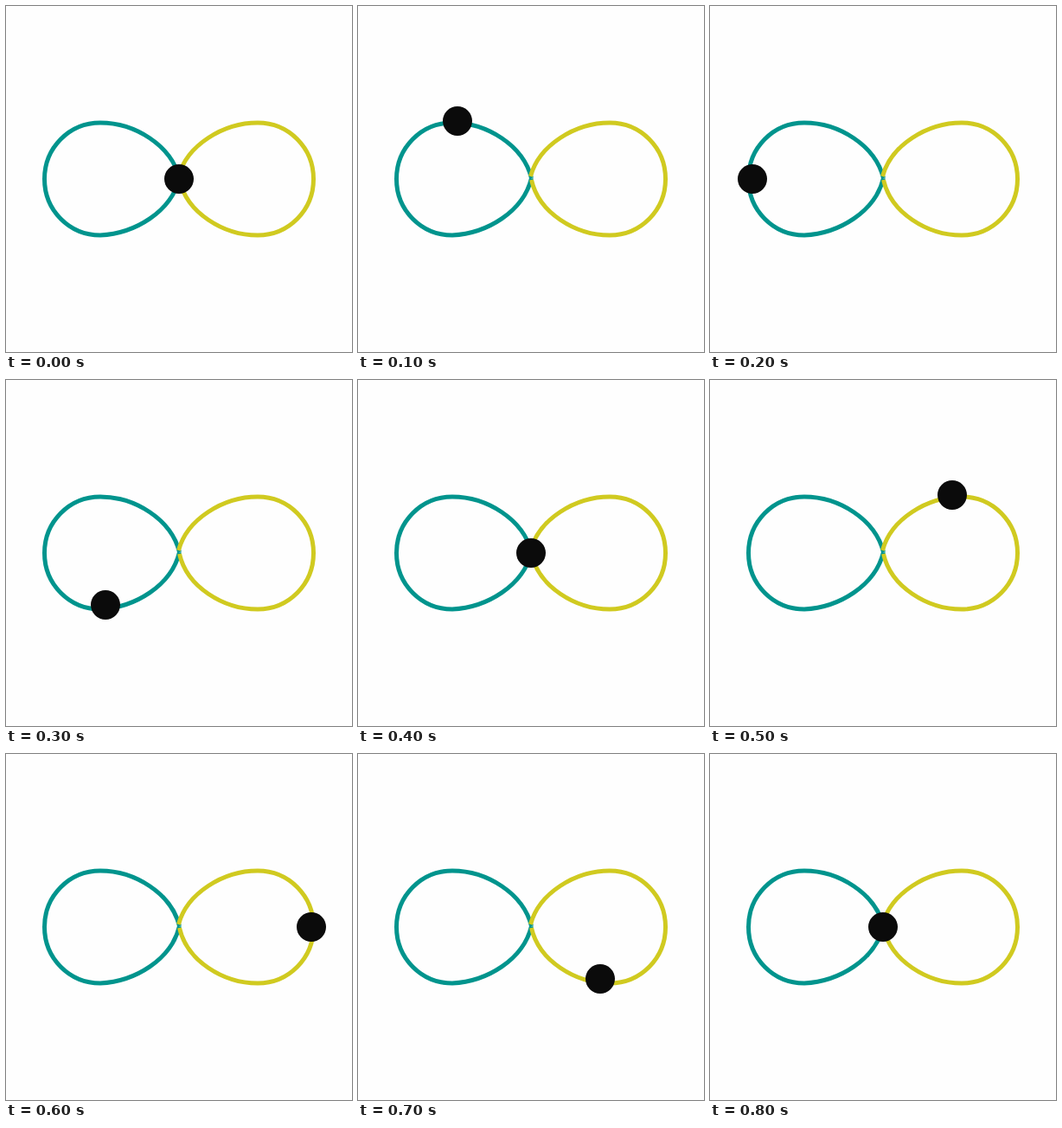
An HTML page that plays this animation: 400 by 400 pixels, repeating every 900 ms.

```html
<!DOCTYPE html>
<html lang="en">
<head>
<meta charset="utf-8">
<title>Infinity loop</title>
<style>
  html, body { margin: 0; width: 100%; height: 100%; overflow: hidden; background: #fefefe; }
  svg { display: block; width: 100%; height: 100%; }
</style>
</head>
<body>
<svg viewBox="0 0 400 400">
  <g fill="none" stroke-width="5">
    <path id="lobe" stroke="#00948d"
      d="M200.5 199C191 161 149 135 109 135C73 135 44.5 164 44.5 200S73 265 109 265C149 263 191 238 200.5 199"/>
    <path stroke="#d0ca20" transform="matrix(-1 0 0 1 400 0)"
      d="M200.5 197C191 161 149 135 109 135C73 135 44.5 164 44.5 200S73 265 109 265C149 265 191 239 199.5 201"/>
  </g>
  <circle id="dot" r="17" fill="#0b0b0b"/>
</svg>
<script>
  const STEP = 100, LOOP = 900;
  const dot = document.getElementById('dot');
  const center = [200, 200];
  // One stop per step; the dot rests at the center when the loop restarts.
  const stops = [
    center, [115, 133], [49, 200], [115, 260],
    center, [280, 133], [353, 200], [280, 260], center
  ];

  function draw() {
    const [x, y] = stops[Math.floor(performance.now() % LOOP / STEP)];
    dot.setAttribute('cx', x);
    dot.setAttribute('cy', y);
    requestAnimationFrame(draw);
  }
  draw();
</script>
</body>
</html>
```
